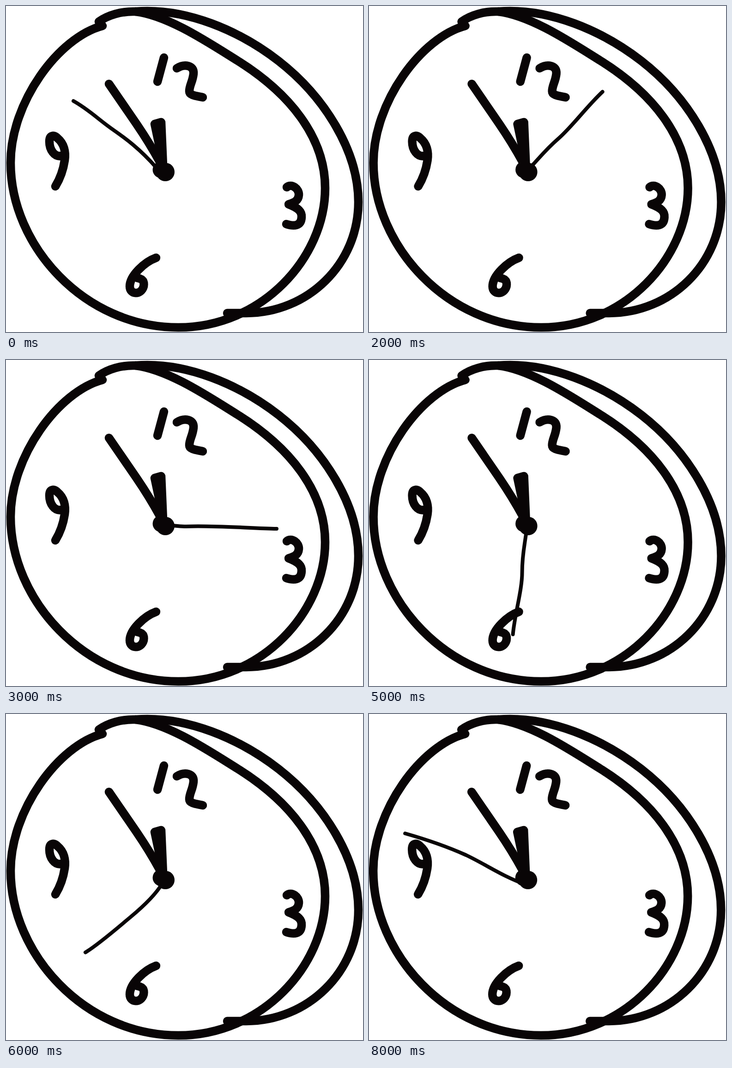
An HTML page for the animation above (9 s loop, 773x707 px).

```html
<!DOCTYPE html>
<html>
<head>
<meta charset="utf-8">
<title>Clock</title>
<style>
html, body { margin: 0; width: 100%; height: 100%; overflow: hidden; background: #fff; }
svg { display: block; }
path { fill: none; stroke: #090506; stroke-width: 18.5; stroke-linecap: round; stroke-linejoin: round; }
.solid, circle { fill: #090506; }
#second { stroke-width: 8; }
</style>
</head>
<body>
<svg width="773" height="707" viewBox="0 0 773 707">
  <g id="clock">
    <!-- face and rim -->
    <path d="M209 43C114 68 10 209 10 340C10 520 170 697 373 697C555 697 691 545 691 395C691 283 612 188 502 119C438 79 350 20 280 12C250 11 220 20 201 34"/>
    <path d="M280 12C390 3 506 54 590 119C690 197 763 315 763 425C763 560 653 666 520 666L479 666"/>
    <!-- numerals -->
    <path d="M342 112L328 164M370 135C386 125 408 128 406 147C404 165 397 172 397 185C397 194 412 195 426 198"/>
    <path d="M608 393C618 384 635 396 634 410C633 424 621 427 612 430C633 438 641 446 640 458C639 478 623 478 607 473"/>
    <path d="M325 546C300 555 268 585 268 608C268 627 293 627 298 608C300 596 295 592 285 590"/>
    <path d="M120 325C105 328 94 312 94 294C94 279 104 279 112 287C125 298 130 315 127 335C124 355 118 373 107 391"/>
    <!-- hands -->
    <path d="M223 169L282 255Q310 296 333 338"/>
    <path class="solid" d="M322 256L336 252L340 345L336 322Z"/>
    <path id="second"/>
    <circle cx="345" cy="360" r="20"/>
    <circle cx="336" cy="355" r="18.5"/>
  </g>
</svg>
<script>
// One drawn pose of the second hand per second
const poses = [
  "M146 206C180 225 200 246 230 267S290 310 325 350",
  "M338 97C338 160 339 250 344 345",
  "M506 186C470 220 440 262 410 288S365 335 345 355",
  "M586 366C530 365 440 358 390 361Q375 361 345 357",
  "M449 545C431 520 406 485 394 457C381 425 371 395 351 365",
  "M312 595C316 550 332 500 332 460S338 400 342 365",
  "M172 517C200 500 240 465 270 440S325 390 338 368",
  "M82 390C130 388 180 372 220 370S300 364 335 360",
  "M79 259C121 271 171 288 211 306C255 327 290 352 338 369"
];
// Slight sideways jitter of the whole drawing
const shifts = [0, -.8, -.4, 0, -.8, -.4, 0, -.4, -.8];
const clock = document.getElementById("clock");
const second = document.getElementById("second");

function draw() {
  const i = Math.floor(performance.now() / 1000) % poses.length;
  second.setAttribute("d", poses[i]);
  clock.setAttribute("transform", `translate(${shifts[i]} 0)`);
  requestAnimationFrame(draw);
}
draw();
</script>
</body>
</html>
```
